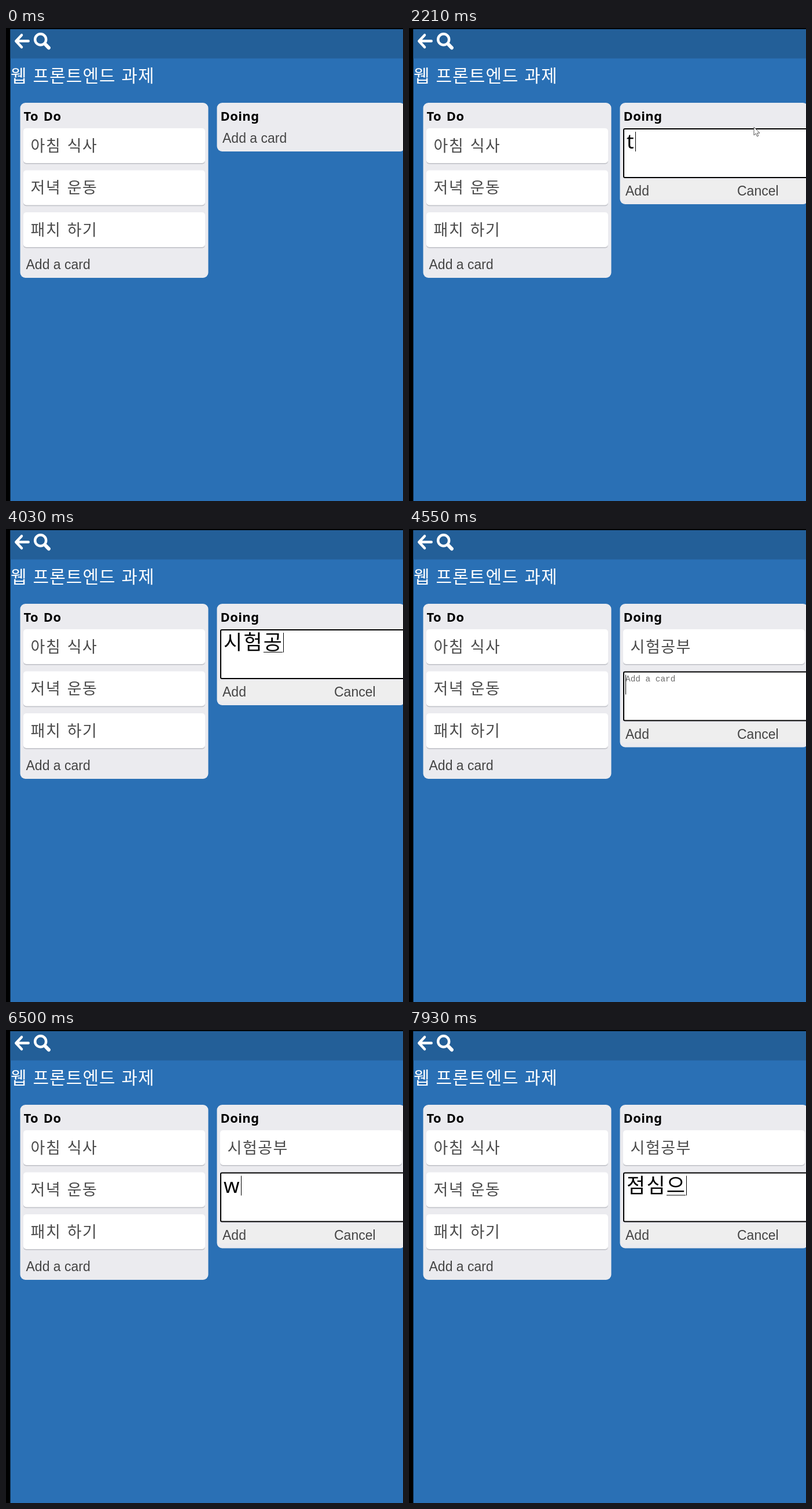
Animation, 686 px wide and 816 px high, one loop 8000 ms. Source, as an HTML page:

```html
<!DOCTYPE html>
<html lang="ko">
<meta charset="utf-8">
<title>Task board</title>
<style>
  html, body { margin: 0; height: 100%; overflow: hidden; background: #000; }
  svg { display: block; width: 686px; height: 816px; }
  text { font-family: "Noto Sans", "Noto Sans CJK KR", sans-serif; white-space: pre; }
  .title { font-size: 30px; letter-spacing: 1px; word-spacing: 1.2px; fill: #fff; }
  .head { font-size: 22px; font-weight: 700; letter-spacing: .4px; word-spacing: 2.5px; }
  .card { font-size: 27px; letter-spacing: 1.5px; word-spacing: 1.9px; fill: #4a4a4a; }
  .btn { font: 23px "Liberation Sans", Arial, sans-serif; fill: #444; }
  .hint { font: 14.4px "Liberation Mono", monospace; fill: #6c6c6c; }
  .input { font-size: 35px; letter-spacing: 2.2px; }
  .list { fill: #ebebef; }
  .icon { fill: none; stroke: #fff; stroke-width: 4.5; stroke-linecap: round; stroke-linejoin: round; }
  .pointer { fill: #fff; stroke: #555; stroke-linejoin: round; }
</style>
<svg viewBox="0 0 686 816">
  <rect x="7.5" y="2" width="679" height="814" fill="#2a70b5"/>
  <rect x="7.5" y="2" width="679" height="50.5" fill="#235f98"/>
  <g class="icon">
    <path d="M38.7 22.6H17.5M27 12.2L17.3 22.6L27 33"/>
    <circle cx="59.7" cy="19.8" r="9.5"/>
    <path d="M68.5 28.7L73.8 34.2" stroke-width="6.2"/>
  </g>
  <text class="title" x="8" y="93">웹 프론트엔드 과제</text>

  <rect class="list" x="24.5" y="129" width="325" height="302" rx="9"/>
  <text class="head" x="30.5" y="160">To Do</text>
  <g id="todo"></g>
  <text class="btn" x="34.5" y="416">Add a card</text>

  <rect class="list" id="doing" x="364.5" y="129" width="325" rx="9"/>
  <text class="head" x="370.5" y="160">Doing</text>
  <g id="done"></g>
  <text class="btn" id="open" x="374" y="198">Add a card</text>
  <g id="form">
    <rect x="366" y="262" width="320" height="34" fill="#eee"/>
    <rect x="371" y="174" width="320" height="84" rx="2" fill="#fff" stroke="#000" stroke-width="2"/>
    <text class="hint" id="hint" x="374" y="190">Add a card</text>
    <text class="input" id="input" x="376" y="208"></text>
    <rect id="under" y="212" width="33" height="1"/>
    <rect id="caret" y="179" width="1" height="34"/>
    <text class="btn" x="374" y="289">Add</text>
    <text class="btn" x="567" y="289">Cancel</text>
  </g>
  <path class="pointer" id="arrow" d="M0 0V14L3.3 11L5.6 16L7.8 15L5.6 10.2H10Z"/>
  <path class="pointer" id="hand" d="M-1.5 11V1.3Q0 -.8 1.5 1.3V7Q3.2 5.6 4.6 7.5Q6.2 6.3 7.5 8.2Q9.3 7.4 9.5 9.6V14Q9 17 7.5 18.5V21H-1V18.5Q-3.5 16 -6 12.5Q-6.5 9.5 -3.7 10.5Z"/>
</svg>
<script>
const LOOP = 8000, STEP = 130, ROW = 72.5;
const OPEN = 780, SAVED = 4550, HIDE = 2340;
const $ = id => document.getElementById(id);
const show = (id, on) => $(id).setAttribute('visibility', on ? 'inherit' : 'hidden');

const card = (x, y, label) => `
  <rect x="${x}" y="${y + 1.7}" width="314" height="60" rx="5" fill="#c4c5cb"/>
  <rect x="${x}" y="${y}" width="314" height="60" rx="5" fill="#fff"/>
  <text class="card" x="${x + 12.6}" y="${y + 39.7}">${label}</text>`;
$('todo').innerHTML = ['아침 식사', '저녁 운동', '패치 하기']
  .map((label, i) => card(30, 173 + i * ROW, label)).join('');
$('done').innerHTML = card(370, 173, '시험공부');

// Runs of input states, one per step; "_" marks a syllable still being composed.
const typing = [
  [2210, ['t', 'tl', 'tlg', 'tlgj', 'tlgja']],
  [3120, ['tlg', 't', '', '시_', '시ㅎ_', '시험_', '시험ㄱ_', '시험공_', '시험공ㅂ_', '시험공부_', '시험공부', '']],
  [6500, ['w', 'wja', 'wjatl']],
  [7020, ['wjat', 'w', '', '저_', '점ㅅ_', '점심_']],
  [7930, ['점심으_']]
];
const caretOff = [[1300, 1820], [5070, 5590], [6240, 6500]];
const path = [
  [130, 620, 330], [260, 560, 270], [520, 505, 215], [650, 477, 184],
  [1040, 505, 181], [1300, 596, 171]
];

function textAt(t) {
  const run = typing.filter(r => r[0] <= t).pop();
  if (!run) return '';
  const i = Math.floor((t - run[0]) / STEP);
  return run[1][Math.min(i, run[1].length - 1)];
}

// The pointer rests after each point and moves in the last steps before the next.
function pointerAt(t) {
  const i = path.findIndex(p => p[0] > t);
  if (i < 0) return path[path.length - 1].slice(1);
  const [t0, x0, y0] = path[Math.max(i - 1, 0)], [t1, x1, y1] = path[i];
  const from = Math.max(t0, t1 - (t1 - t0 > 2 * STEP ? STEP : 2 * STEP));
  const k = Math.max(0, (t - from) / (t1 - from || 1));
  return [x0 + (x1 - x0) * k, y0 + (y1 - y0) * k];
}

function draw(now) {
  const t = Math.floor(now % LOOP / STEP) * STEP;
  const opened = t >= OPEN, saved = t >= SAVED;
  $('doing').setAttribute('height', saved ? 247.5 : opened ? 175 : 84);
  show('done', saved);
  show('open', !opened);
  show('form', opened);
  $('form').setAttribute('transform', `translate(0 ${saved ? ROW : 0})`);

  const raw = textAt(t), text = raw.replace('_', '');
  $('input').textContent = text;
  const end = text ? Math.round(376 + $('input').getComputedTextLength()) : 374;
  $('under').setAttribute('x', end - 34);
  $('caret').setAttribute('x', end);
  show('hint', opened && !text);
  show('under', raw !== text);
  show('caret', opened && !caretOff.some(([a, b]) => t >= a && t < b));

  const seen = t >= path[0][0] && t < HIDE, over = t >= 650 && t < 1040;
  const [x, y] = pointerAt(t);
  for (const id of ['arrow', 'hand']) {
    $(id).setAttribute('transform', `translate(${x} ${y})`);
    show(id, seen && over === (id === 'hand'));
  }
}

const start = performance.now();
function frame() {
  draw(performance.now() - start);
  requestAnimationFrame(frame);
}
frame();
</script>
</html>
```
